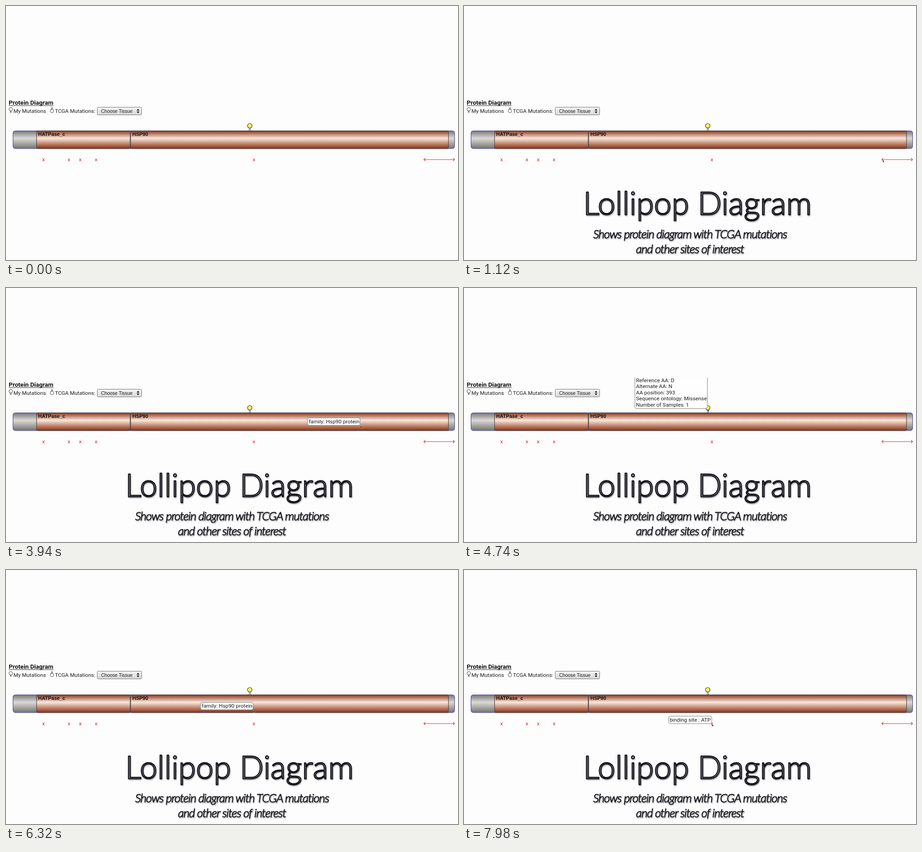
Recreate the animation shown at these times as an HTML page. Size 998 by 561 pixels, loop 8000 ms.

```html
<!DOCTYPE html>
<html lang="en">
<head>
<meta charset="utf-8">
<title>Lollipop Diagram</title>
<style>
  html, body { margin: 0; width: 100%; height: 100%; overflow: hidden; background: #fdfdfd; }
  svg { display: block; width: 100%; height: 100%; font: 11.8px Roboto, sans-serif; fill: #1c1c1c; }
  .heading { font-weight: 700; font-size: 13.5px; fill: #111; }
  .select { font: 10.5px "Liberation Sans", Arial, sans-serif; }
  .domain { font: 700 11px "Liberation Sans", Arial, sans-serif; fill: #16100e; }
  .site { fill: #dc1c24; text-anchor: middle; }
  .line { fill: none; stroke: #444; }
  .captions { text-anchor: middle; fill: #a5a5ad; stroke: #15151c; stroke-linejoin: round;
    filter: drop-shadow(1px 2px 1px #0005); }
  .title { font: 300 70px Lato, sans-serif; stroke-width: 2.5px; }
  .subtitle { font: italic 300 26px Lato, sans-serif; letter-spacing: -1.1px; stroke-width: 1.1px; }
</style>
</head>
<body>
<svg viewBox="0 0 998 561" preserveAspectRatio="none">
  <defs>
    <linearGradient id="gray" x2="0" y2="1">
      <stop stop-color="#777"/><stop offset=".42" stop-color="#dcdad7"/><stop offset="1" stop-color="#74746f"/>
    </linearGradient>
    <linearGradient id="brown" x2="0" y2="1">
      <stop stop-color="#8c371b"/><stop offset=".42" stop-color="#fae8dd"/><stop offset="1" stop-color="#8d300d"/>
    </linearGradient>
    <linearGradient id="button" x2="0" y2="1">
      <stop stop-color="#f4f4f4"/><stop offset="1" stop-color="#d8d8d8"/>
    </linearGradient>
    <clipPath id="panel"><rect y="198" width="998" height="363"/></clipPath>
  </defs>

  <text class="heading" x="6" y="217.5">Protein Diagram</text>
  <path d="M6 220H105" stroke="#222" stroke-width="1.2"/>
  <g class="line">
    <circle cx="10.5" cy="228" r="3.9"/><path d="M9.5 232v4M11.5 232v4"/>
    <circle cx="101.5" cy="231.8" r="3.9"/><path d="M100.5 228v-4.5M102.5 228v-4.5"/>
  </g>
  <text x="16.5" y="235.5">My Mutations</text>
  <text x="108" y="235.5">TCGA Mutations:</text>
  <rect x="201.5" y="223.5" width="98" height="17" rx="2" fill="url(#button)" stroke="#70707c"/>
  <text class="select" x="210" y="235.5">Choose Tissue</text>
  <path d="M288.5 231l3-4 3 4zM288.5 233l3 4 3-4z"/>

  <g stroke-width="1.2">
    <rect x="15.5" y="275.8" width="975" height="39" rx="5" fill="url(#gray)" stroke="#4c4c9c"/>
    <g fill="url(#brown)" stroke="#54423f">
      <rect x="67.5" y="275.8" width="206.7" height="39" rx="3"/>
      <rect x="275.2" y="275.8" width="701.8" height="39" rx="3"/>
    </g>
  </g>
  <text class="domain" x="71" y="287.3">HATPase_c</text>
  <text class="domain" x="279" y="287.3">HSP90</text>
  <path class="line" d="M537 269v6.5M539.5 269v6.5"/>
  <circle cx="538.2" cy="264.5" r="5" fill="#f8f262" stroke="#44442c" stroke-width="1.2"/>
  <g id="sites"></g>
  <path d="M922.5 339.2H990.5M926 336l-3.5 3.2 3.5 3.2M987 336l3.5 3.2-3.5 3.2" fill="none" stroke="#dc2a30" stroke-width="1.1"/>

  <g id="captions" class="captions">
    <text class="title" x="515.5" y="461">Lollipop Diagram</text>
    <g class="subtitle">
      <text x="499" y="513">Shows protein diagram with TCGA mutations</text>
      <text x="499" y="546">and other sites of interest</text>
    </g>
  </g>

  <g id="tips" clip-path="url(#panel)"></g>
  <path id="cursor" d="M0 0v5l1.2-1 1 2 .9-.4-.9-2h1.6z" fill="#111" stroke="#fff" stroke-width=".4"/>
</svg>
<script>
const LOOP = 8000;
const $ = id => document.getElementById(id);
const clamp = v => Math.min(1, Math.max(0, v));

$('sites').innerHTML = [83, 139, 164, 199, 547.5]
  .map(x => `<text class="site" x="${x}" y="342.5">x</text>`).join('');

// Each tooltip hangs above and to the left of the pointer while its area is hovered.
const tips = [
  { width: 116, lines: ['family: Hsp90 protein'],
    hit: (x, y) => x > 275 && x < 977 && y > 276 && y < 315 },
  { width: 160, lines: ['Reference AA: D', 'Alternate AA: N', 'AA position: 393',
      'Sequence ontology: Missense', 'Number of Samples: 1'],
    hit: (x, y) => Math.hypot(x - 538.2, y - 264.5) < 6 },
  { width: 95.5, lines: ['binding site : ATP'],
    hit: (x, y) => Math.abs(x - 547.5) < 3 && y > 336 && y < 341.5 },
];
for (const tip of tips) {
  const count = tip.lines.length;
  const height = count > 1 ? 80 : 16.5;
  tip.node = document.createElementNS('http://www.w3.org/2000/svg', 'g');
  tip.node.innerHTML =
    `<rect x="${-tip.width}" y="${-height}" width="${tip.width}" height="${height}" rx="4" fill="#fefefe" stroke="#777d85"/>` +
    tip.lines.map((line, i) =>
      `<text x="${2.5 - tip.width}" y="${-4.5 - (count - 1 - i) * 13.6}">${line}</text>`).join('');
  $('tips').append(tip.node);
}

// Pointer path: time, x, y
const path = [
  [400, 937, 356.5], [620, 937, 356.5], [1050, 924.5, 340], [2500, 924.5, 340],
  [2750, 932, 353], [3050, 880, 318], [3340, 849, 307], [3940, 783, 304.5],
  [4650, 538, 267.5], [6100, 538, 267.5], [6500, 553, 344], [7120, 548.5, 342], [7400, 547.7, 340.3],
];
function pointerAt(t) {
  const next = path.findIndex(p => p[0] > t);
  if (next < 1) return (next < 0 ? path[path.length - 1] : path[0]).slice(1);
  const [t0, x0, y0] = path[next - 1], [t1, x1, y1] = path[next];
  const u = (t - t0) / (t1 - t0);
  return [x0 + (x1 - x0) * u, y0 + (y1 - y0) * u];
}

function draw(t) {
  const [x, y] = pointerAt(t);
  $('captions').setAttribute('opacity', clamp((t - 200) / 900));
  $('cursor').setAttribute('transform', `translate(${x} ${y})`);
  $('cursor').setAttribute('opacity', t < 400 ? 0 : 1);
  for (const tip of tips) {
    tip.node.setAttribute('transform', `translate(${x - .7} ${y - 1})`);
    tip.node.setAttribute('visibility', tip.hit(x, y) ? 'visible' : 'hidden');
  }
}

const start = performance.now();
function tick() {
  draw((performance.now() - start) % LOOP);
  requestAnimationFrame(tick);
}
tick();
</script>
</body>
</html>
```
